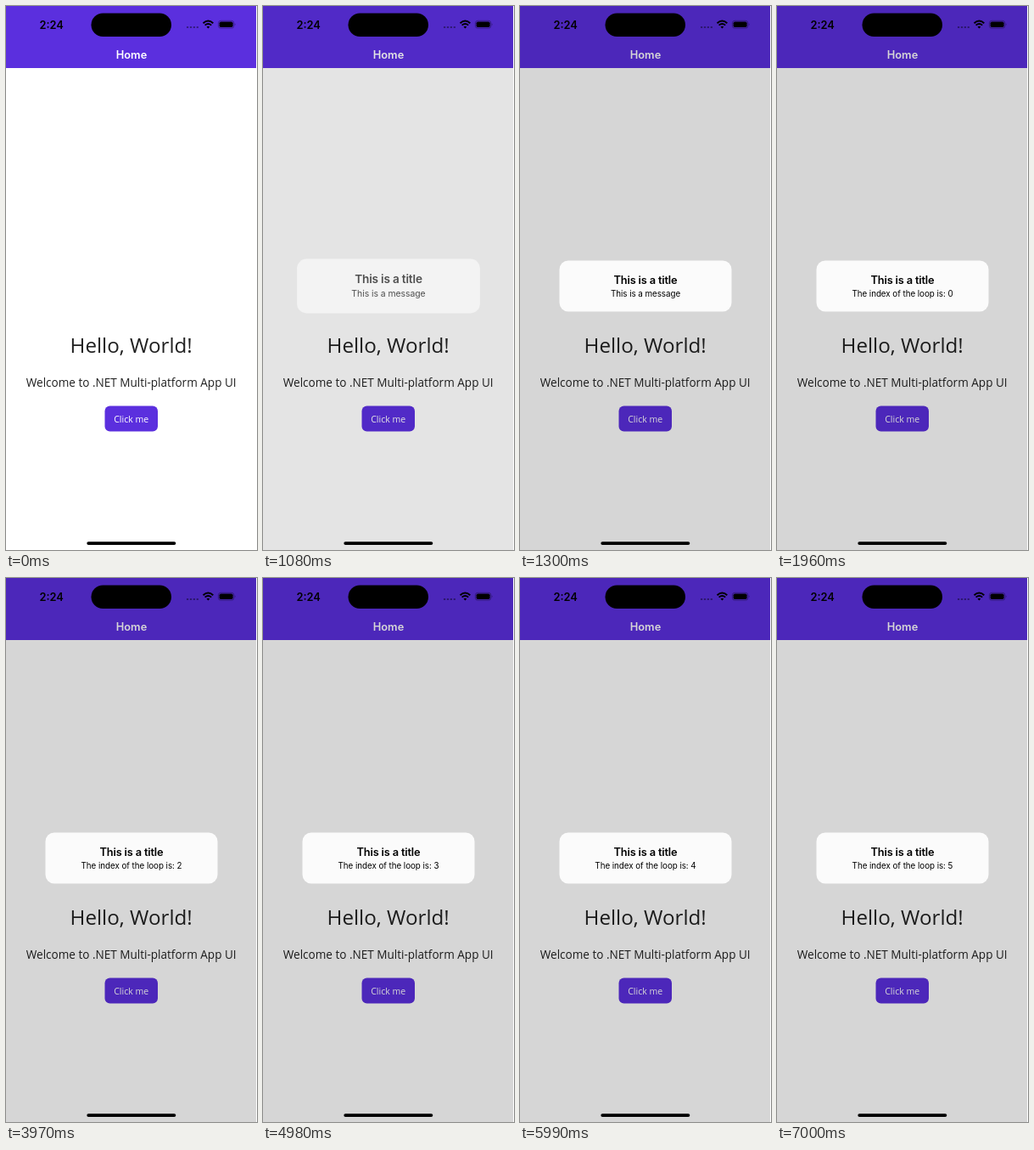
An HTML page that plays this animation: 296x640 px, repeating every 8000 ms.

```html
<!DOCTYPE html>
<html lang="en">
<head>
<meta charset="utf-8">
<style>
  html, body { margin: 0; width: 100%; height: 100%; overflow: hidden; background: #fff; }
  svg { display: block; width: 296px; height: 640px; }
  text { text-anchor: middle; font-family: "Open Sans", sans-serif; fill: #212121; }
  .system { font-family: Inter, sans-serif; font-size: 12.8px; font-weight: 600; fill: #000; }
  .message { font-size: 9.8px; font-weight: 400; letter-spacing: -.04px; }
  .light { fill: #fff; }
  .primary { fill: #5b2fde; }
</style>
</head>
<body>
<svg viewBox="0 0 296 640">
  <rect class="primary" width="295" height="73"/>
  <text class="system light" x="148" y="61.6">Home</text>
  <text x="147.7" y="407.6" font-size="24.2">Hello, World!</text>
  <text x="147.7" y="447.8" font-size="13.56">Welcome to .NET Multi-platform App UI</text>
  <rect class="primary" x="116.5" y="470.5" width="62.5" height="30" rx="6"/>
  <text class="light" x="147.7" y="489.7" font-size="10.55">Click me</text>

  <rect id="dim" width="295" height="640"/>

  <!-- Status bar and home indicator -->
  <text class="system" x="53.7" y="26.6">2:24</text>
  <rect x="100.5" y="8.5" width="94.5" height="27.5" rx="13.75"/>
  <path d="M213 25h14" stroke="#000" stroke-opacity=".4" stroke-width="2" stroke-dasharray="2.2 1.7"/>
  <g fill="none" stroke="#000" stroke-width="1.9">
    <path d="M232.5 20.2q5.9 -5.4 11.8 0M234.6 22.6q3.8 -3.4 7.6 0"/>
  </g>
  <path d="M236.5 24.5q1.9 -1.6 3.8 0l-1.9 2z"/>
  <rect x="250.4" y="17.3" width="18.4" height="8.9" rx="2.8" fill="none" stroke="#000" stroke-opacity=".4" stroke-width=".8"/>
  <rect x="251.6" y="18.5" width="16" height="6.5" rx="1.8"/>
  <path d="M269.8 20.2q1.6 1.5 0 3z" opacity=".45"/>
  <rect x="95.3" y="630.2" width="105" height="3.8" rx="1.9"/>

  <g id="alert">
    <rect x="46.5" y="299.5" width="203" height="60" rx="10.5" fill="#fbfbfb"/>
    <text class="system" x="148" y="326.6" letter-spacing="-.17">This is a title</text>
    <text class="system message" id="message" x="148" y="341.6"></text>
  </g>
</svg>
<script>
  const LOOP = 8000;
  const countTimes = [1960, 2970, 3970, 4980, 5990, 7000];
  const [dim, alertBox, message] = ["dim", "alert", "message"].map(id => document.getElementById(id));

  // The alert appears in three hard steps.
  const appearance = t => t < 1080 ? 0 : t < 1190 ? .65 : t < 1300 ? .92 : 1;

  function draw(now) {
    const t = now % LOOP;
    const shown = appearance(t);
    const index = countTimes.filter(time => t >= time).length - 1;
    const scale = 1 + .18 * (1 - shown);
    dim.setAttribute("opacity", .16 * shown);
    alertBox.setAttribute("opacity", shown);
    alertBox.setAttribute("transform", `translate(148 329.5) scale(${scale}) translate(-148 -329.5)`);
    message.textContent = index < 0 ? "This is a message" : `The index of the loop is: ${index}`;
    requestAnimationFrame(draw);
  }
  requestAnimationFrame(draw);
</script>
</body>
</html>
```
